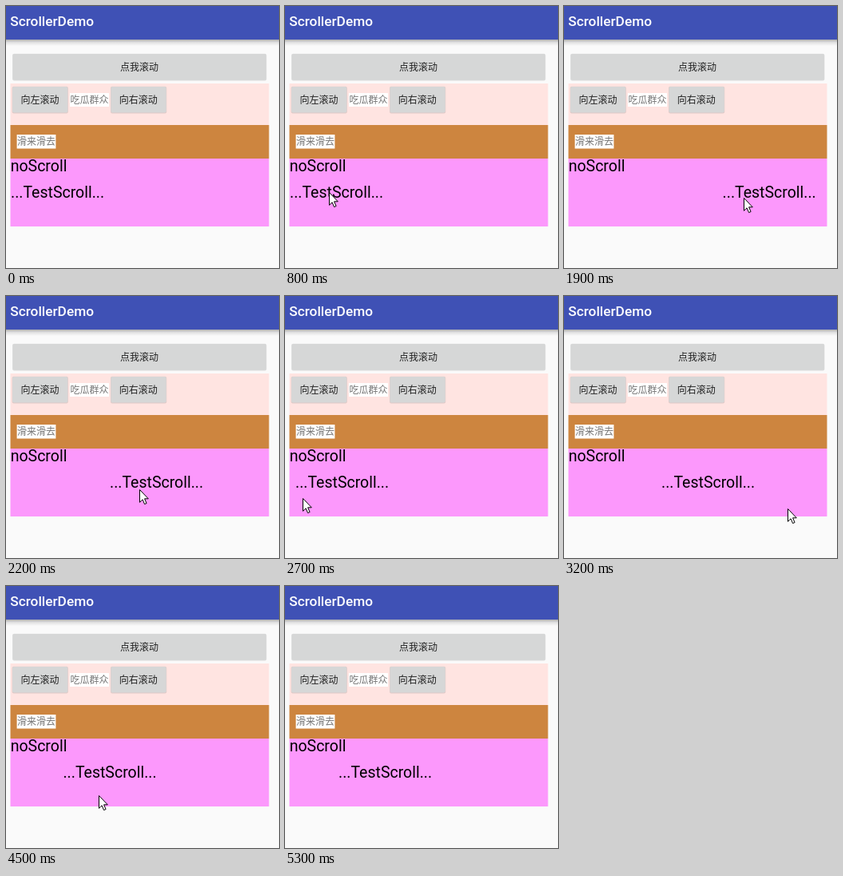
Recreate the animation shown at these times as an HTML page. Size 342 px wide and 328 px high, loop 6.4 s.

```html
<!DOCTYPE html>
<html lang="zh">
<head>
<meta charset="utf-8">
<title>ScrollerDemo</title>
<style>
  html, body { margin: 0; width: 100%; height: 100%; overflow: hidden; background: #fafafa; }
  svg { display: block; }
  text { font-family: Roboto, "Noto Sans CJK SC", "Noto Sans CJK", sans-serif; }
  .label { font-size: 12px; fill: #222; text-anchor: middle; }
  .hint { font-size: 12px; fill: #757575; }
  .big { font-size: 19.5px; fill: #000; }
</style>
</head>
<body>
<svg width="342" height="328" viewBox="0 0 342 328">
  <defs>
    <linearGradient id="shade" x1="0" y1="0" x2="0" y2="1">
      <stop offset="0" stop-color="#000" stop-opacity=".3"/>
      <stop offset=".45" stop-color="#000" stop-opacity=".1"/>
      <stop offset="1" stop-color="#000" stop-opacity="0"/>
    </linearGradient>
    <clipPath id="panel"><rect x="5.5" y="191" width="324" height="85"/></clipPath>
  </defs>
  <rect width="342" height="328" fill="#fafafa"/>
  <rect y="42" width="342" height="8" fill="url(#shade)"/>
  <rect width="342" height="42" fill="#3f51b5"/>
  <text x="5.3" y="25" font-size="17.3" font-weight="500" fill="#fff">ScrollerDemo</text>

  <rect x="5.5" y="97" width="324" height="52" fill="#ffe4e1"/>
  <rect x="5.5" y="149" width="324" height="42" fill="#cd853f"/>
  <rect x="5.5" y="191" width="324" height="85" fill="#fc98fc"/>
  <g id="buttons"></g>
  <rect x="80" y="109" width="49" height="17" fill="#fff"/>
  <text class="hint" x="80.4" y="121.7">吃瓜群众</text>
  <rect x="13.6" y="161" width="48.8" height="17.5" fill="#fff"/>
  <text class="hint" x="14" y="174">滑来滑去</text>

  <g class="big" clip-path="url(#panel)">
    <text x="5.7" y="207">noScroll</text>
    <text id="slider" y="240">...TestScroll...</text>
  </g>
  <path id="cursor" d="M.5 .5V16.3L4.1 12.8L6.6 18.6L9.1 17.5L6.6 11.8H11.3Z"
        fill="#fff" stroke="#000" stroke-linejoin="round"/>
</svg>
<script>
const LOOP = 6400, STEP = 100;
const GRAB = 800, RELEASE = 4500, GRIP = 49;
const $ = id => document.getElementById(id);

// Turning points of the pointer: time, x, y
const path = [
  [100, 262, 137], [800, 55, 233], [1300, 207, 235], [1500, 238, 236],
  [1700, 257, 238], [2100, 179, 241], [2200, 167, 242], [2600, 62, 252],
  [2700, 22, 253], [2900, 12, 254], [3300, 330, 270], [3500, 319, 276],
  [3900, 314, 250], [4200, 149, 268], [4500, 116, 262], [4900, 328, 165],
  [5200, 249, 220]
];

// Monotone cubic through the turning points; axis 1 is x, axis 2 is y
function pointer(axis, t) {
  const last = path.length - 1;
  if (t <= path[0][0]) return path[0][axis];
  if (t >= path[last][0]) return path[last][axis];
  const slope = i => (path[i + 1][axis] - path[i][axis]) / (path[i + 1][0] - path[i][0]);
  const tangent = i => {
    const a = slope(Math.max(i - 1, 0)), b = slope(Math.min(i, last - 1));
    return a * b > 0 ? 2 * a * b / (a + b) : 0;
  };
  const i = path.findIndex(p => p[0] > t) - 1;
  const h = path[i + 1][0] - path[i][0], u = (t - path[i][0]) / h, v = 1 - u;
  return path[i][axis] * (1 + 2 * u) * v * v + path[i + 1][axis] * u * u * (3 - 2 * u)
    + h * u * v * (tangent(i) * v - tangent(i + 1) * u);
}

// The dragged text follows the pointer one step late
function sliderX(t) {
  const held = Math.min(Math.max(t - STEP, GRAB), RELEASE);
  return pointer(1, held) - GRIP;
}

function button(x, y, w, label) {
  return `<rect x="${x - .4}" y="${y - .2}" width="${w + .8}" height="33.6" rx="2" fill-opacity=".12"/>`
    + `<rect x="${x}" y="${y}" width="${w}" height="32.6" rx="2" fill="#d6d7d7"/>`
    + `<text class="label" x="${x + w / 2 - .3}" y="${y + 20.5}">${label}</text>`;
}

$("buttons").innerHTML = button(8.5, 60, 317.5, "点我滚动")
  + button(8, 101, 69.4, "向左滚动") + button(131.4, 101, 69.4, "向右滚动");

function draw(time) {
  const t = Math.floor(time % LOOP / STEP) * STEP;
  $("slider").setAttribute("x", sliderX(t));
  const shown = t >= 100 && t < 5300;
  $("cursor").setAttribute("visibility", shown ? "visible" : "hidden");
  const x = Math.round(pointer(1, t)), y = Math.round(pointer(2, t));
  $("cursor").setAttribute("transform", `translate(${x} ${y})`);
}

const start = performance.now();
function tick() {
  draw(performance.now() - start);
  requestAnimationFrame(tick);
}
tick();
</script>
</body>
</html>
```
